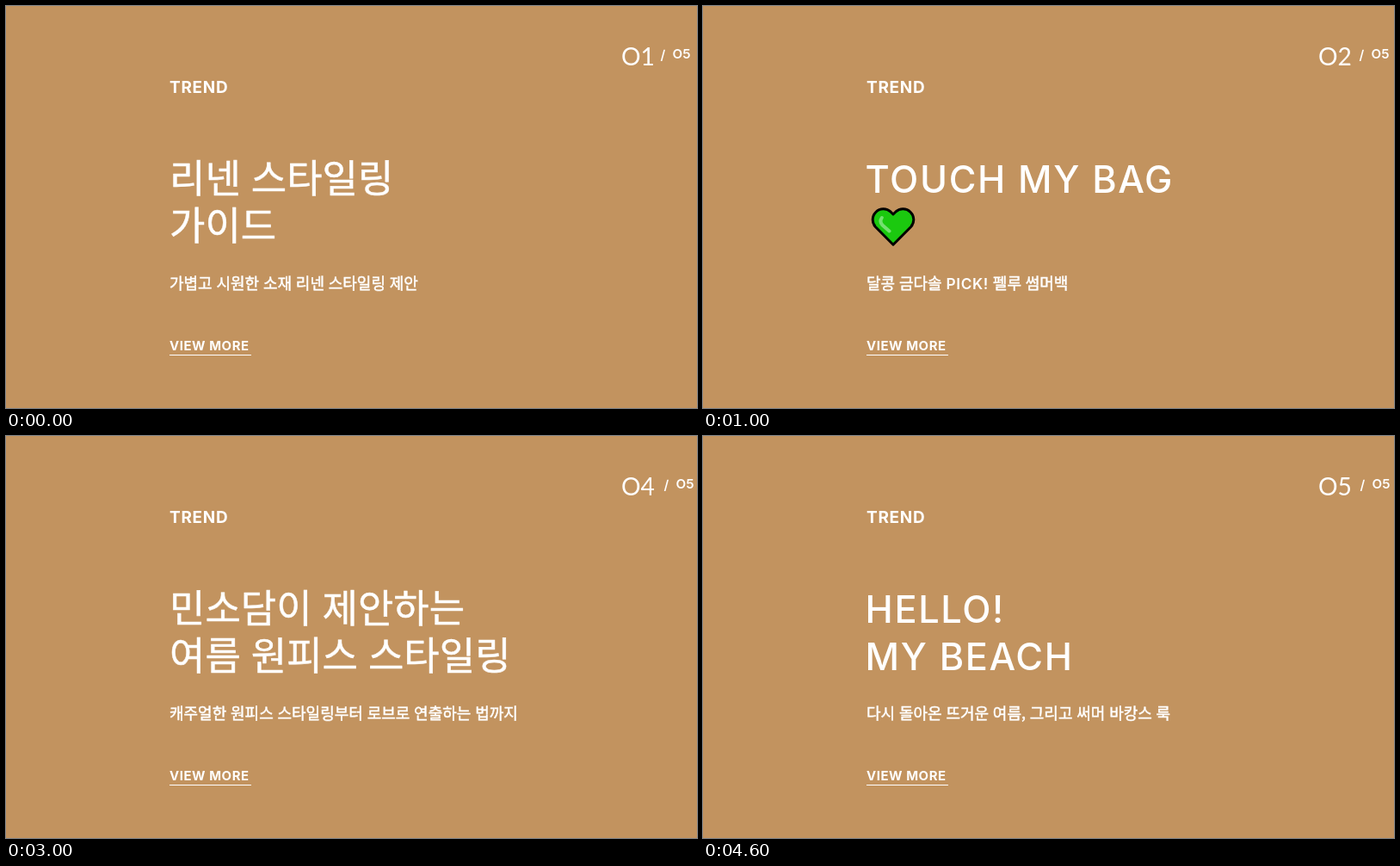
Write an HTML page that moves like this. It is 803 px wide and 467 px high and loops after 5 s.

```html
<!DOCTYPE html>
<html lang="ko">
<head>
<meta charset="utf-8">
<title>Trend slides</title>
<style>
  html, body { margin: 0; width: 100%; height: 100%; overflow: hidden; background: #c2935f; }
  svg { display: block; width: 803px; height: 467px; }
  text { fill: #fff; white-space: pre; font-optical-sizing: none; }
  .ko { font-family: 'Noto Sans CJK KR', 'Noto Sans CJK', sans-serif; word-spacing: -.014em; stroke: #fff; }
  .en { font-family: Inter, sans-serif; letter-spacing: .038em; word-spacing: 0; }
  .title.ko { font-size: 45px; stroke-width: .5px; }
  .title.en { font-size: 43.3px; font-weight: 500; }
  .sub { font-size: 18px; stroke-width: .5px; }
  .sub .en { font-size: 17.3px; font-weight: 600; stroke: none; }
  .label { font-size: 19px; font-weight: 700; }
  .more { font-size: 14.9px; font-weight: 700; }
  .now { font: 400 28.2px Lato, sans-serif; }
  .all { font: 600 15.2px Inter, sans-serif; }
</style>
</head>
<body>
<svg id="stage" viewBox="0 0 803 467"></svg>
<script>
const LEFT = 190, LINE = 55, HOLD = 1000;
const ZERO = 'O'; // round zero

const heart = `
  <path d="M221 277.2L200.6 256.8A12.45 12.45 0 0 1 218.2 239.2L221 242L223.8 239.2A12.45 12.45 0 0 1 241.4 256.8Z"
    fill="#1bc90f" stroke="#000" stroke-width="3" stroke-linejoin="round"/>
  <path d="M207.8 246Q204.5 251 209 255L216.5 261.5" fill="none" stroke="#75e070"
    stroke-width="4" stroke-linecap="round"/>`;

const slides = [
  { type: 'ko', title: ['리넨 스타일링', '가이드'], sub: '가볍고 시원한 소재 리넨 스타일링 제안', shift: 0 },
  { type: 'en', title: ['TOUCH MY BAG', ''], art: heart,
    sub: '달콩 금다솔 <tspan class="en">PICK!</tspan> 펠루 썸머백', shift: 2 },
  { type: 'ko', title: ['써머 백 앤 슈즈'], sub: '여름에 완벽한 백앤슈즈 컬렉션', shift: 2.5 },
  { type: 'ko', title: ['민소담이 제안하는', '여름 원피스 스타일링'],
    sub: '캐주얼한 원피스 스타일링부터 로브로 연출하는 법까지', shift: 4 },
  { type: 'en', title: ['HELLO!', 'MY BEACH'], sub: '다시 돌아온 뜨거운 여름, 그리고 써머 바캉스 룩', shift: 3 }
];

const text = (style, x, y, value) => `<text class="${style}" x="${x}" y="${y}">${value}</text>`;

function draw(slide, index) {
  const { type, title, sub, art = '', shift } = slide;
  const drop = (title.length - 1) * LINE;
  const titleX = type === 'en' ? LEFT - 1.5 : LEFT;
  return '<g visibility="hidden">' +
    text('now', 715, 69, ZERO + (index + 1)) +
    text('all', 760.5 + shift, 61.5, '/') +
    text('all', 774.5 + shift, 61, ZERO + slides.length) +
    title.map((line, i) => text('title ' + type, titleX, 217 + i * LINE, line)).join('') +
    art +
    text('sub ko', LEFT, 274 + drop, sub) +
    text('more en', LEFT, 345 + drop, 'VIEW MORE') +
    `<rect x="${LEFT}" y="${350 + drop}" width="95" height="1" fill="#fff"/></g>`;
}

const stage = document.getElementById('stage');
stage.innerHTML = text('label en', LEFT, 101, 'TREND') + slides.map(draw).join('');
const groups = [...stage.querySelectorAll('g')];
const start = performance.now();

function show() {
  const current = Math.floor((performance.now() - start) / HOLD) % slides.length;
  groups.forEach((group, i) => group.setAttribute('visibility', i === current ? 'visible' : 'hidden'));
  requestAnimationFrame(show);
}
show();
</script>
</body>
</html>
```
